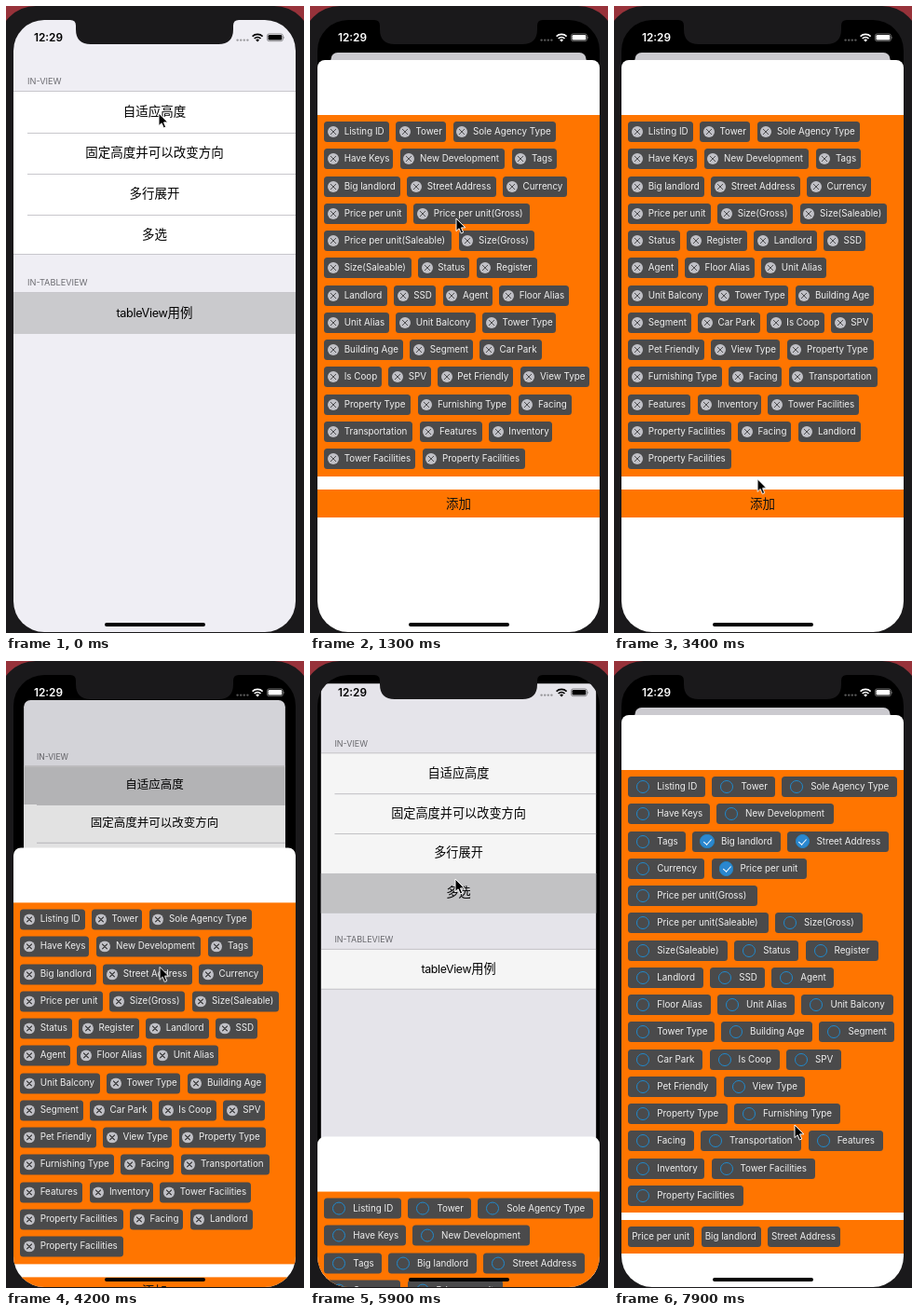
Recreate the animation shown at these times as an HTML page. Size 320 by 673 pixels, loop 8000 ms.

```html
<!DOCTYPE html>
<html lang="zh-CN">
<head>
<meta charset="utf-8">
<title>Tag list demo</title>
<style>
@property --up { syntax: "<number>"; inherits: true; initial-value: 0; }
@property --step { syntax: "<integer>"; inherits: true; initial-value: 0; }

html, body { margin: 0; width: 320px; height: 673px; overflow: hidden; }
body {
  position: relative; background: #97323a;
  font-family: Inter, "Noto Sans CJK SC", "Noto Sans CJK", sans-serif;
}
div, svg { position: absolute; }

.phone { left: -8px; top: 0; width: 336px; height: 720px; border-radius: 40px; background: #1a191b; }
.screen {
  left: 8px; top: 15px; width: 303px; height: 657px; border-radius: 33px;
  overflow: hidden; background: #000;
  animation: present 8s infinite;
  /* critically damped spring, used by keyframes without their own easing */
  animation-timing-function: linear(0, .09 4.17%, .264 8.33%, .442 12.5%, .594 16.67%,
    .801 25%, .908 33.3%, .96 41.7%, .983 50%, .997 66.7%, 1);
}

/* list behind the sheet */
.card {
  inset: 0; border-radius: 8px; overflow: hidden; background: #efeef4;
  transform-origin: 50% 0;
  transform: translateY(calc(var(--up) * 35px)) scale(calc(1 - .0957 * var(--up)));
}
.dim { inset: 0; background: #000; opacity: calc(.15 * var(--up)); }
.head { left: 15px; font-size: 9.2px; line-height: 12px; color: #6d6d72; }
.group { left: 0; width: 303px; border: solid #c8c7cc; border-width: .8px 0; background: #fff; box-sizing: border-box; }
.row { left: 0; width: 303px; height: 43.9px; font-size: 13.5px; line-height: 43.5px; text-align: center; color: #000; }
.row + .row::before { content: ""; position: absolute; left: 15px; right: 0; top: 0; height: .8px; background: #c8c7cc; }
.row span { position: relative; }
.latin { font-size: 12.7px; letter-spacing: -.35px; }
.hit { inset: 0; background: #cacacd; opacity: 0; }
.hit.first { animation: first 8s infinite; }
.hit.multi { animation: multi 8s infinite step-end; }
.hit.table { animation: table 8s infinite; }

/* sheet */
.sheet {
  left: 0; top: 43px; width: 303px; height: 640px; border-radius: 8px 8px 0 0;
  overflow: hidden; background: #fff;
  transform: translateY(calc((1 - var(--up)) * 615px));
  animation: step 8s infinite step-end;
}
.state {
  inset: 0;
  opacity: calc(1 - max(var(--step) - var(--n), var(--n) - var(--step)));
}
.box { left: 0; width: 303px; background: #ff7500; }
.add { height: 29.6px; font-size: 13.5px; line-height: 30.8px; text-align: center; color: #111; }
.tag {
  height: 22px; border-radius: 3.5px; background: #4a4a4b; box-sizing: border-box;
  font-size: 9.8px; line-height: 22px; white-space: nowrap; color: #f0f0f0;
}
.plain { padding-left: 4px; }
.close { padding-left: 21.4px; }
.check { padding-left: 31px; }
.tag::before, .tag::after { position: absolute; box-sizing: border-box; }
.close::before {
  content: ""; left: 3.8px; top: 5px; width: 12px; height: 12px; border-radius: 50%;
  background:
    linear-gradient(45deg, transparent 44%, #505052 44% 56%, transparent 56%) center / 6px 6px no-repeat,
    linear-gradient(-45deg, transparent 44%, #505052 44% 56%, transparent 56%) center / 6px 6px no-repeat,
    #c0c0c6;
}
.check::before {
  content: ""; left: 9px; top: 4px; width: 14px; height: 14px;
  border: 1.1px solid #2089cc; border-radius: 50%;
}
.check.on::before { left: 8.2px; top: 3.2px; width: 15.6px; height: 15.6px; background: #2b87cf; }
.check.on::after {
  content: ""; left: 14px; top: 6px; width: 4.5px; height: 8px;
  border: solid #fff; border-width: 0 1.6px 1.6px 0; transform: rotate(42deg);
}

/* status bar and frame */
.status {
  --c: calc(255 * clamp(0, (var(--up) - .4) * 5, 1));
  inset: 0; color: rgb(var(--c) var(--c) var(--c));
}
.clock { left: 22px; top: 11px; font-size: 11.8px; font-weight: 600; line-height: 16px; }
.home { left: 106px; top: 661.5px; width: 108px; height: 4px; border-radius: 2px; background: #000; }
.cursor { left: 0; top: 0; overflow: visible; animation: move 8s infinite; }

@keyframes present {
  0%, 5% { --up: 0; }
  12.65% { --up: 1; }
  46.5% { --up: 1; animation-timing-function: linear; }
  52.5% { --up: .769; animation-timing-function: linear; }
  54.4% { --up: .69; animation-timing-function: cubic-bezier(.3, .4, .3, 1); }
  61%, 73.125% { --up: 0; }
  80.775%, 100% { --up: 1; }
}
@keyframes step {
  0% { --step: 0; }
  20% { --step: 1; }
  23.75% { --step: 2; }
  32% { --step: 3; }
  36% { --step: 4; }
  42.5% { --step: 5; }
  72% { --step: 6; }
  84.4% { --step: 7; }
  89.5% { --step: 8; }
  94.75%, 100% { --step: 9; }
}
@keyframes first {
  0%, 4.99% { opacity: 0; }
  5%, 58% { opacity: 1; }
  62%, 100% { opacity: 0; }
}
@keyframes multi { 0% { opacity: 0; } 72.4%, 100% { opacity: 1; } }
@keyframes table { 0% { opacity: 1; } 5%, 100% { opacity: 0; } }
@keyframes move {
  0%, 9% { transform: translate(164px, 115px); }
  16.25% { transform: translate(157px, 228px); }
  18.5% { transform: translate(123px, 222px); }
  24% { transform: translate(121px, 223px); }
  28.75% { transform: translate(143px, 468px); }
  30.5% { transform: translate(152px, 504px); }
  40%, 42.5% { transform: translate(154px, 508px); }
  46.5% { transform: translate(158px, 186px); animation-timing-function: linear; }
  52.5% { transform: translate(165px, 328px); animation-timing-function: linear; }
  54.4% { transform: translate(167px, 376px); }
  62.5%, 66% { transform: translate(196px, 274px); }
  70%, 74% { transform: translate(156px, 234px); }
  78.75%, 82% { transform: translate(157px, 232px); }
  84%, 85.5% { transform: translate(140px, 221px); }
  89%, 90.5% { transform: translate(132px, 192px); }
  94.5%, 95.5% { transform: translate(220px, 192px); }
  98.75%, 100% { transform: translate(194px, 498px); }
}
</style>
</head>
<body>
<div class="phone"></div>
<div class="screen">
  <div class="card">
    <div class="head" style="top:59.5px">IN-VIEW</div>
    <div class="group" style="top:76px;height:176.4px">
      <div class="row" style="top:0"><div class="hit first"></div><span>自适应高度</span></div>
      <div class="row" style="top:43.9px"><span>固定高度并可以改变方向</span></div>
      <div class="row" style="top:87.8px"><span>多行展开</span></div>
      <div class="row" style="top:131.7px"><div class="hit multi"></div><span>多选</span></div>
    </div>
    <div class="head" style="top:275.5px">IN-TABLEVIEW</div>
    <div class="group" style="top:292.4px;height:44.5px">
      <div class="row" style="top:0"><div class="hit table"></div><span><span class="latin">tableView</span>用例</span></div>
    </div>
    <div class="dim"></div>
  </div>
  <div class="status">
    <div class="clock">12:29</div>
    <svg style="left:238px;top:13px" width="54" height="12" fill="currentColor">
      <g opacity=".35">
        <circle cx="2.6" cy="8.6" r="1.2"/><circle cx="6.2" cy="8.6" r="1.2"/>
        <circle cx="9.8" cy="8.6" r="1.2"/><circle cx="13.4" cy="8.6" r="1.2"/>
      </g>
      <g fill="none" stroke="currentColor" stroke-width="1.7">
        <path d="M18.6 4.6a8 8 0 0 1 11 0"/><path d="M20.7 7a5 5 0 0 1 6.8 0"/>
      </g>
      <path d="M22.2 8.4a3 3 0 0 1 3.8 0L24.1 10.6Z"/>
      <rect x="34.4" y="1.9" width="17" height="7.8" rx="2.2" fill="none" stroke="currentColor" stroke-width=".8" opacity=".5"/>
      <rect x="35.5" y="3" width="14.8" height="5.6" rx="1.3"/>
      <path d="M52.4 4.4q1.2 1.4 0 2.8Z" opacity=".6"/>
    </svg>
  </div>
  <div class="sheet"></div>
</div>
<svg style="left:0;top:0" width="320" height="50">
  <path fill="#1a191b" d="M69 14V15Q75 15 75 21V25Q75 41 91 41H228Q244 41 244 25V21Q244 15 250 15V14Z"/>
</svg>
<div class="home"></div>
<svg class="cursor" width="12" height="18">
  <path d="M0 0V13.6L3.1 10.8L5.3 16L7.7 15L5.5 9.9H9.8Z" stroke="#fff" stroke-width="1"/>
</svg>

<script>
const EDGE = 7.3, TAG_H = 22, PITCH = TAG_H + EDGE - .03, TOP = 58.7, RIGHT = 296;

// label and width with a close icon
const widths = {
  "Listing ID": 69.4, "Tower": 54.2, "Sole Agency Type": 110, "Have Keys": 74.1,
  "New Development": 112.5, "Tags": 48, "Big landlord": 81.7, "Street Address": 95.6,
  "Currency": 68.5, "Price per unit": 88.7, "Price per unit(Gross)": 125,
  "Price per unit(Saleable)": 137, "Size(Gross)": 81, "Size(Saleable)": 93.3,
  "Status": 55.5, "Register": 65, "Landlord": 67.3, "SSD": 45.3, "Agent": 53.5,
  "Floor Alias": 75, "Unit Alias": 69.7, "Unit Balcony": 85.6, "Tower Type": 79,
  "Building Age": 84.7, "Segment": 67.5, "Car Park": 66.5, "Is Coop": 61.7, "SPV": 45.3,
  "Pet Friendly": 81.5, "View Type": 74.2, "Property Type": 93, "Furnishing Type": 100.7,
  "Facing": 57, "Transportation": 95, "Features": 67, "Inventory": 68.5,
  "Tower Facilities": 98, "Property Facilities": 110.6
};
const extra = { close: 0, check: 13.4, plain: -17.6 };
const all = Object.keys(widths);
const sheet = document.querySelector(".sheet");

function add(parent, cls, style, text = "") {
  const el = document.createElement("div");
  el.className = cls;
  for (const k in style) el.style[k] = style[k] + "px";
  el.textContent = text;
  return parent.appendChild(el);
}

// Orange box with wrapped tags; returns its lower edge.
function tagBox(parent, top, names, kind, on = []) {
  const box = add(parent, "box", { top });
  let x = EDGE, y = EDGE;
  for (const name of names) {
    const width = widths[name] + extra[kind];
    if (x > EDGE && x + width > RIGHT) { x = EDGE; y += PITCH; }
    add(box, `tag ${kind}${on.includes(name) ? " on" : ""}`, { left: x, top: y, width }, name);
    x += width + EDGE;
  }
  const height = y + TAG_H + EDGE;
  box.style.height = height + "px";
  return top + height;
}

function state(n) {
  const el = add(sheet, "state", {});
  el.style.setProperty("--n", n);
  return el;
}

const noGross = all.filter(s => s !== "Price per unit(Gross)");
const short = noGross.filter(s => s !== "Price per unit(Saleable)");
const added = ["Facing", "Landlord", "Property Facilities"];
const lists = [all, noGross, short, ...added.map((_, i) => [...short, ...added.slice(0, i + 1)])];
lists.forEach((names, i) => {
  const el = state(i);
  const end = tagBox(el, TOP, names, "close");
  add(el, "box add", { top: end + 14.7 }, "添加");
});

const picks = ["Price per unit", "Big landlord", "Street Address"];
for (let i = 0; i <= picks.length; i++) {
  const el = state(lists.length + i), on = picks.slice(0, i);
  const end = tagBox(el, TOP, all, "check", on);
  if (i) tagBox(el, end + EDGE, on, "plain");
}
</script>
</body>
</html>
```
